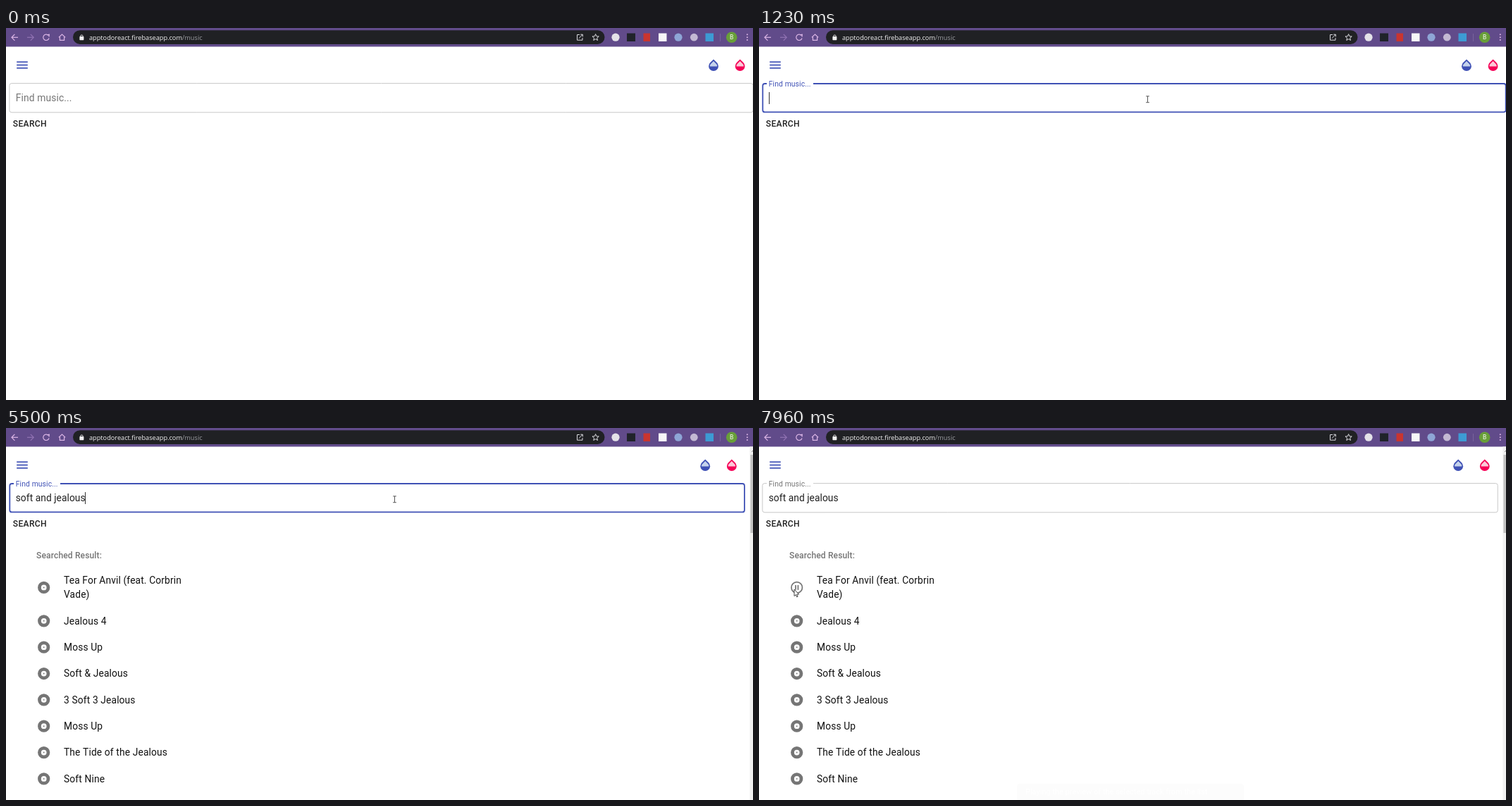
An HTML page with a canvas for the animation above (7.99 s loop, 1060x528 px).

```html
<!DOCTYPE html>
<html lang="en">
<head>
<meta charset="utf-8">
<title>Music search</title>
<style>
html, body { margin: 0; width: 100%; height: 100%; overflow: hidden; background: #fff; }
canvas { display: block; }
</style>
</head>
<body>
<canvas id="stage" width="1060" height="528"></canvas>
<script>
const ctx = document.getElementById('stage').getContext('2d');
const LOOP = 7990;
const BLUE = [63, 81, 181], GREY = [117, 117, 117];
const FOCUS = 1040, RESULTS = 5240, BLUR = 7430, PAUSE = 7860;

const query = 'soft and jealous';
const keyTimes = [1430, 1620, 1790, 2090, 2290, 2550, 2810, 2970,
  3070, 3230, 3420, 3680, 3940, 4140, 4340, 4430];
const songs = ['Jealous 4', 'Moss Up', 'Soft & Jealous', '3 Soft 3 Jealous',
  'Moss Up', 'The Tide of the Jealous', 'Soft Nine'];

// time, x, y of the pointer
const pointerPath = [
  [20, 900, 498], [810, 551.5, 101], [6010, 551.5, 101], [6400, 180, 198],
  [6800, 76, 214], [7070, 46, 229], [7850, 46, 229], [7960, 50, 229]
];

const drop = new Path2D('M12 2.35L6.34 8A8 8 0 1 0 17.66 8z');
const dropTop = new Path2D('M6 14C6 12 6.6 10.7 7.76 9.6L12 5.27l4.24 4.38C17.4 10.8 18 12 18 14z');
const arrow = new Path2D('M0 0V9.6L2.2 7.6 3.6 10.9 5.1 10.2 3.7 7.1H6.6z');

const clamp = v => Math.max(0, Math.min(1, v));
const lerp = (a, b, p) => a + (b - a) * p;
const progress = (t, from, to) => clamp((t - from) / (to - from));
const easeOut = p => 1 - (1 - p) ** 3;
const smooth = p => p * p * (3 - 2 * p);
const mix = (a, b, p) => `rgb(${a.map((v, i) => Math.round(lerp(v, b[i], p)))})`;

function text(str, x, y, size, color, { weight = 400, spacing = 0, font = 'Roboto', align = 'left' } = {}) {
  ctx.font = `${weight} ${size}px ${font}, sans-serif`;
  ctx.letterSpacing = `${spacing}px`;
  ctx.textAlign = align;
  ctx.fillStyle = color;
  ctx.fillText(str, x, y);
  return ctx.measureText(str).width;
}

function rect(x, y, w, h, color, radius = 0) {
  ctx.fillStyle = color;
  ctx.beginPath();
  ctx.roundRect(x, y, w, h, radius);
  ctx.fill();
}

function disc(x, y, r, color) {
  ctx.fillStyle = color;
  ctx.beginPath();
  ctx.arc(x, y, r, 0, Math.PI * 2);
  ctx.fill();
}

function ring(x, y, r, width, color, from = 0, to = Math.PI * 2) {
  ctx.strokeStyle = color;
  ctx.lineWidth = width;
  ctx.beginPath();
  ctx.arc(x, y, r, from, to);
  ctx.stroke();
}

function line(color, width, ...points) {
  ctx.strokeStyle = color;
  ctx.lineWidth = width;
  ctx.beginPath();
  for (let i = 0; i < points.length; i += 2) ctx.lineTo(points[i], points[i + 1]);
  ctx.stroke();
}

function drawBrowserBar() {
  const tint = '#dcb6e6', dim = '#9274b4', pale = '#dcdce0';
  rect(0, 0, 1060, 26.5, '#614b8a');

  line(tint, 1.2, 17, 13.3, 8, 13.3);
  line(tint, 1.2, 12.4, 8.8, 8, 13.3, 12.4, 17.8);
  line(dim, 1.2, 30, 13.3, 39, 13.3);
  line(dim, 1.2, 34.8, 8.8, 39.2, 13.3, 34.8, 17.8);
  ring(57, 13.3, 4.2, 1.2, tint, 0.3, Math.PI * 1.75);
  rect(58, 9, 3.6, 1.3, tint);
  rect(60.4, 8.4, 1.3, 4, tint);
  line(tint, 1.2, 74.8, 13.4, 79.5, 9, 84.2, 13.4);
  line(tint, 1.2, 76.4, 12.5, 76.4, 17.4, 82.6, 17.4, 82.6, 12.5);

  rect(95, 3.2, 754.5, 19.8, '#202124', 9.9);
  rect(104.4, 12, 6, 5.2, '#f1f1f1', 0.7);
  ring(107.4, 11.8, 1.8, 1, '#f1f1f1', Math.PI, 0);
  const width = text('apptodoreact.firebaseapp.com', 118, 16.7, 9.2, '#f4f4f4', { font: '"Open Sans"' });
  text('/music', 118 + width, 16.7, 9.2, '#9a9ca0', { font: '"Open Sans"' });

  line(pale, 1, 814, 9.5, 810.5, 9.5, 810.5, 17.2, 818, 17.2, 818, 14);
  line(pale, 1, 813, 14.6, 818, 9.4);
  line(pale, 1, 815.2, 9.2, 818.3, 9.2, 818.3, 12.4);

  ctx.beginPath();
  for (let i = 0; i < 10; i++) {
    const r = i % 2 ? 2.2 : 4.9, a = (i / 5 - 0.5) * Math.PI;
    ctx.lineTo(836.6 + r * Math.cos(a), 13.5 + r * Math.sin(a));
  }
  ctx.closePath();
  ctx.strokeStyle = pale;
  ctx.lineWidth = 1;
  ctx.stroke();

  disc(865, 13.2, 5.6, '#e4e2e8');
  rect(881, 7.5, 12, 11.5, '#20232a');
  rect(904.5, 7.5, 9.5, 11.5, '#c9352f');
  rect(926, 7.5, 11.5, 11.5, '#f7f7f7');
  disc(954, 13.2, 5.6, '#8ea6d6');
  disc(976.3, 13.2, 5.4, '#c3b9d3');
  rect(992.5, 7.5, 11.5, 11.5, '#3d9bd4');
  rect(1013, 8, 1, 11, '#77649c');
  disc(1029.7, 13.2, 7.8, '#689f38');
  text('B', 1029.7, 16.3, 8.5, '#fff', { align: 'center' });
  for (const y of [9.3, 13.2, 17.1]) disc(1051.8, y, 1, tint);
}

function drawDrop(cx, color, light) {
  ctx.save();
  ctx.translate(cx - 10.35, 42.4);
  ctx.scale(0.8625, 0.8625);
  ctx.fillStyle = color;
  ctx.fill(drop);
  ctx.fillStyle = light;
  ctx.fill(dropTop);
  ctx.restore();
}

function drawHeader(shift) {
  for (const y of [47.4, 51.7, 56]) rect(15.2, y, 15.6, 1.7, '#3f51b5');
  drawDrop(1004 - shift, '#3f51b5', '#c5d3ec');
  drawDrop(1041.6 - shift, '#f50057', '#fcc9d8');
}

function drawField(t, shift, hover) {
  const focused = t >= FOCUS && t < BLUR;
  const lift = easeOut(progress(t, FOCUS, 1230));
  const left = 4.4, top = 78.1, right = 1060.6 - shift, bottom = 120.3;
  const weight = focused ? 1.8 : 1, inset = weight / 2;

  ctx.strokeStyle = focused ? '#3f51b5' : hover ? '#333' : '#c8c8c8';
  ctx.lineWidth = weight;
  ctx.beginPath();
  ctx.roundRect(left + inset, top + inset, right - left - weight, bottom - top - weight, 3);
  ctx.stroke();
  if (lift > 0) rect(11, top - 1, 66 * lift, 4, '#fff');

  const tone = t < BLUR
    ? mix(GREY, BLUE, lift)
    : mix(BLUE, GREY, progress(t, BLUR, BLUR + 200));
  const size = lerp(13.8, 10.35, lift);
  text('Find music...', 13.8, lerp(104.4, 83.1, lift), size, tone, { spacing: size * 0.0094 });

  const count = keyTimes.filter(k => k <= t).length;
  const typed = query.slice(0, count);
  const width = text(typed, 13.7, 104.4, 13.8, '#212121', { spacing: 0.05 });
  const lastKey = count ? keyTimes[count - 1] : 1020;
  const caretOn = t >= 1020 && t < BLUR && Math.floor((t - lastKey) / 528) % 2 === 0;
  if (caretOn) rect(Math.round(13.5 + width), 91, 1, 17, '#333');

  text('SEARCH', 9.8, 139.9, 12.07, '#212121', { weight: 500, spacing: 0.345 });
}

function drawAlbum(y) {
  ring(53.7, y, 6.25, 4.75, '#757575');
  disc(53.7, y, 0.95, '#757575');
}

function drawPause(y) {
  ring(53.7, y, 7.75, 1.7, '#757575');
  rect(51.1, y - 3.45, 1.75, 6.9, '#757575');
  rect(54.55, y - 3.45, 1.75, 6.9, '#757575');
}

function drawResults(t) {
  const row = (str, y) => text(str, 82, y, 13.8, '#111', { spacing: 0.13 });
  text('Searched Result:', 43, 185, 12.07, '#757575', { weight: 500, spacing: 0.13 });
  row('Tea For Anvil (feat. Corbrin', 220.7);
  row('Vade)', 241.4);
  (t >= PAUSE ? drawPause : drawAlbum)(226.4);
  songs.forEach((song, i) => {
    const y = 273.8 + i * 37.35;
    drawAlbum(y);
    row(song, y + 4.7);
  });

  rect(1055.4, 26.5, 5, 502, '#f1f1f1');
  rect(1056.4, 38, 4, 111, '#c1c1c1');
  line('#777', 1, 1058.2, 33.8, 1060, 32);

  const toast = progress(t, 7900, 8300) * 0.08;
  if (toast > 0) {
    rect(366, 505, 322, 24, `rgba(50, 50, 50, ${toast})`, 3);
    text('Playing the preview of the selected track from the list', 378, 520, 11, '#fff');
  }
}

function pointerAt(t) {
  let i = 0;
  while (i < pointerPath.length - 2 && t >= pointerPath[i + 1][0]) i++;
  const [t0, x0, y0] = pointerPath[i], [t1, x1, y1] = pointerPath[i + 1];
  const raw = progress(t, t0, t1);
  const p = i === 3 ? raw : smooth(raw);
  return [lerp(x0, x1, p), lerp(y0, y1, p)];
}

function drawPointer(t, x, y, overField) {
  if (t < 20) return;
  const pressed = (t >= 980 && t < 1140) || (t >= BLUR && t < 7700);
  if (pressed) disc(x - (overField ? 0.8 : 0), y, 8, 'rgba(253, 246, 75, 0.85)');
  if (overField) {
    line('#555', 1, x, y - 4, x, y + 4.5);
    line('#555', 1, x - 2.3, y - 4.2, x + 2.3, y - 4.2);
    line('#555', 1, x - 2.3, y + 4.7, x + 2.3, y + 4.7);
    return;
  }
  ctx.save();
  ctx.translate(x, y);
  ctx.fillStyle = '#fff';
  ctx.fill(arrow);
  ctx.strokeStyle = '#333';
  ctx.lineWidth = 0.9;
  ctx.stroke(arrow);
  ctx.restore();
}

function draw() {
  const t = performance.now() % LOOP;
  const shift = t >= RESULTS ? 11.8 : 0;
  const [x, y] = pointerAt(t);
  const overField = t >= 20 && y > 78 && y < 120;

  rect(0, 0, 1060, 528, '#fff');
  drawBrowserBar();
  drawHeader(shift);
  drawField(t, shift, overField);
  if (t >= RESULTS) drawResults(t);
  drawPointer(t, x, y, overField);
  requestAnimationFrame(draw);
}
draw();
</script>
</body>
</html>
```
